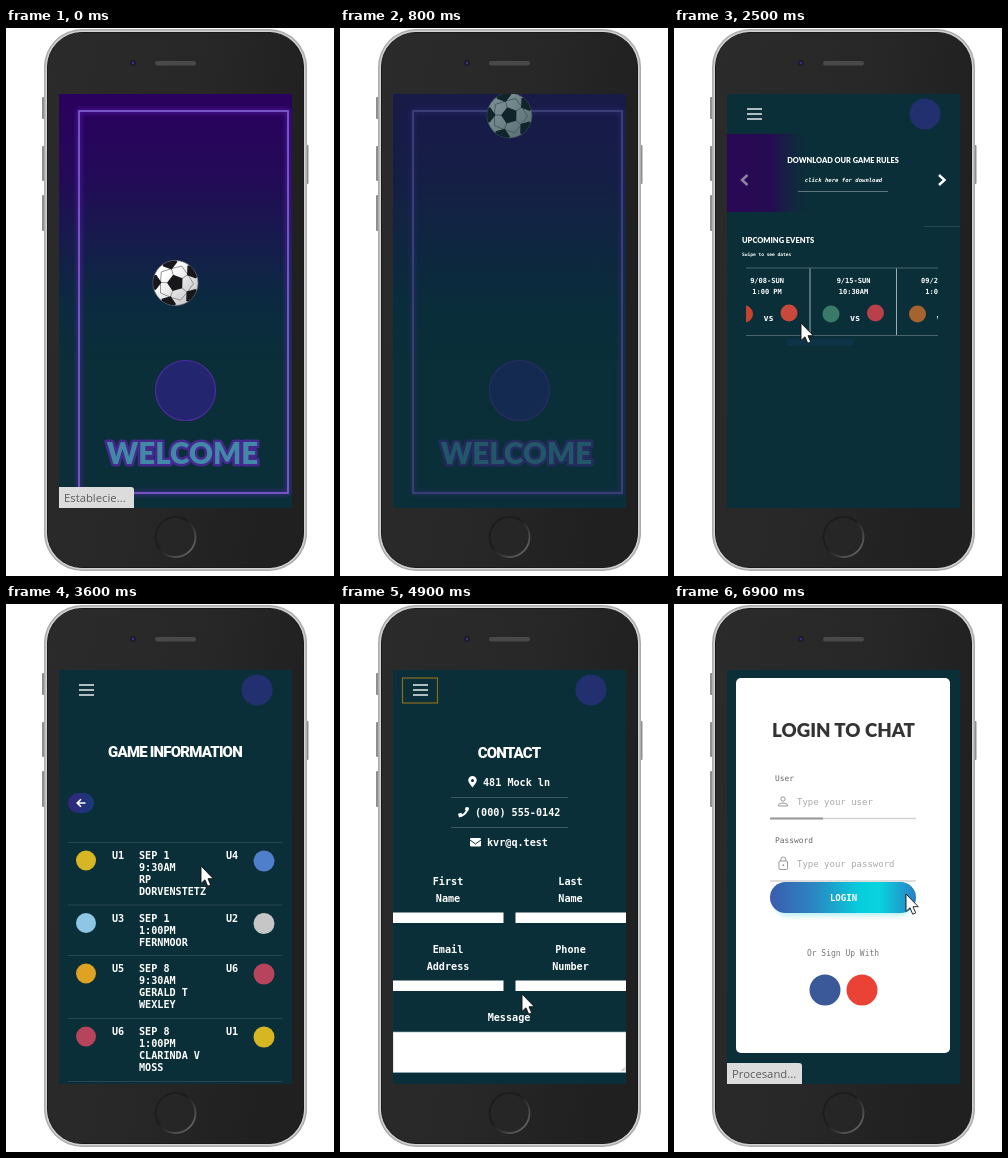
Write an HTML page that moves like this. It is 328 px wide and 548 px high and loops after 8000 ms.

```html
<!DOCTYPE html>
<html lang="en">
<head>
<meta charset="utf-8">
<title>League app demo</title>
<style>
html, body { margin: 0; width: 100%; height: 100%; overflow: hidden; background: #fff; }
svg { display: block; }
.scene { display: none; }
.mono { font-family: "DejaVu Sans Mono", "Noto Sans Mono", monospace; }
.geo { font-family: Lato, sans-serif; font-weight: 900; }
.head { font: 900 15px Roboto, sans-serif; letter-spacing: -.8px; }
.ui { font-family: "Open Sans", sans-serif; }
.b { font-weight: 700; }
</style>
</head>
<body>
<svg id="stage" width="328" height="548" viewBox="0 0 328 548"></svg>
<script>
const rect = (x, y, w, h, fill, more = '') =>
  `<rect x="${x}" y="${y}" width="${w}" height="${h}" fill="${fill}" ${more}/>`;
const disc = (x, y, r, fill, more = '') => `<circle cx="${x}" cy="${y}" r="${r}" fill="${fill}" ${more}/>`;
const path = (d, stroke, w = 1, more = 'fill="none"') =>
  `<path d="${d}" stroke="${stroke}" stroke-width="${w}" ${more}/>`;
const text = (s, x, y, size, cls = 'mono b', fill = '#fff', anchor = 'start', more = '') =>
  `<text x="${x}" y="${y}" font-size="${size}" class="${cls}" fill="${fill}" text-anchor="${anchor}" ${more}>${s}</text>`;
const mid = (s, x, y, size, cls, fill, more) => text(s, x, y, size, cls, fill, 'middle', more);
const group = (id, body, more = '') => `<g id="${id}" ${more}>${body}</g>`;
const scene = (id, body) => group(id, body, 'class="scene"');
const gradient = (id, dir, stops) => `<linearGradient id="${id}" ${dir}>` +
  stops.map(([o, c, a = 1]) => `<stop offset="${o}" stop-color="${c}" stop-opacity="${a}"/>`).join('') +
  '</linearGradient>';

const BG = '#0a2f38', RULE = '#2b474e';
const DOWN = 'x1="0" y1="0" x2="0" y2="1"', ACROSS = 'x1="0" y1="0" x2="1" y2="0"';
const DIAGONAL = 'x1="0" y1="0" x2="1" y2="1"';

const defs = `<defs>
  <clipPath id="screenClip">${rect(53, 66, 233, 414, '#000')}</clipPath>
  <clipPath id="stripClip">${rect(72, 238, 192, 72, '#000')}</clipPath>
  <clipPath id="ballClip">${disc(0, 0, 22.5, '#000')}</clipPath>
  <filter id="glow" x="-20%" y="-60%" width="140%" height="220%"><feGaussianBlur stdDeviation="2.5"/></filter>
  ${gradient('bodyFill', 'x1="0" y1="0" x2="1" y2=".3"', [[0, '#2b2b2b'], [.6, '#272727'], [1, '#202020']])}
  ${gradient('ringFill', DIAGONAL, [[.45, '#1c1c1c'], [1, '#777']])}
  ${gradient('nightFill', DOWN, [[0, '#2b005e'], [.2, '#230a57'], [.36, '#161c4c'], [.5, '#0b2a40'], [.65, BG]])}
  ${gradient('violetFill', ACROSS, [[0, '#2b0756'], [.5, '#250d52'], [1, BG, 0]])}
  ${gradient('pillFill', ACROSS, [[0, '#33267f'], [1, '#173a78']])}
  ${gradient('ballFill', DIAGONAL, [[.3, '#fff'], [1, '#b9b9bd']])}
  ${gradient('buttonFill', ACROSS, [[0, '#3a5dae'], [.3, '#2b86c2'], [.62, '#05cfdc'], [.75, '#08d3de'], [1, '#2a7fc4']])}
</defs>`;

const phone = () =>
  [[36, 69, 22], [36, 118, 35], [36, 167, 36], [299, 117, 39]]
    .map(([x, y, h]) => rect(x, y, 3.5, h, '#8f8f8f', 'rx="1"')).join('') +
  rect(38, 1, 263, 542, '#a9abac', 'rx="38"') +
  rect(39.5, 2.5, 260, 539, '#cfd1d2', 'rx="36.5"') +
  rect(41.5, 4.5, 256, 535, 'url(#bodyFill)', 'rx="34.5" stroke="#191919"') +
  disc(127, 35, 3, '#1b1b2b') + disc(127, 35, 1.3, '#34347a') +
  rect(149, 33, 41, 4.5, '#494949', 'rx="2.2"') +
  disc(169.5, 509, 20, '#262626', 'stroke="url(#ringFill)" stroke-width="1.8"');

const polar = (r, deg) => {
  const a = deg * Math.PI / 180;
  return [r * Math.cos(a), r * Math.sin(a)];
};
const pentagon = (x, y, r, turn) => 'M' + [0, 1, 2, 3, 4].map(i => {
  const [dx, dy] = polar(r, turn + 72 * i);
  return `${(x + dx).toFixed(1)} ${(y + dy).toFixed(1)}`;
}).join('L') + 'Z';

function ball() {
  let patches = pentagon(0, 0, 8.5, 110), seams = '';
  for (let i = 0; i < 5; i++) {
    const a = 110 + 72 * i, [x1, y1] = polar(8, a), [x2, y2] = polar(15, a), [x, y] = polar(22, a);
    seams += `M${x1} ${y1}L${x2} ${y2}`;
    patches += pentagon(x, y, 8, a + 180);
    const [x3, y3] = polar(15, a + 72);
    seams += `M${x2} ${y2}L${polar(18, a + 36).join(' ')}L${x3} ${y3}`;
  }
  return disc(0, 0, 22.5, 'url(#ballFill)', 'stroke="#777" stroke-width=".7"') +
    `<g clip-path="url(#ballClip)">${path(seams, '#888', .9)}${path(patches, 'none', 0, 'fill="#17171b"')}</g>`;
}

const frame = (stroke, w, more = '') => rect(73, 83, 209, 382, 'none', `stroke="${stroke}" stroke-width="${w}" ${more}`);
const splash = () => rect(53, 66, 233, 414, 'url(#nightFill)') +
  frame('#6a2bd0', 4, 'filter="url(#glow)" opacity=".5"') + frame('#6b43bd', 2) + frame('#9577d6', .6) +
  disc(179.5, 362.5, 30, '#23256f', 'stroke="#4c2b9c" stroke-width="1.2"') +
  mid('WELCOME', 176.5, 435.5, 29.5, 'geo', '#45298f', 'stroke="#45298f" stroke-width="5" stroke-linejoin="round"') +
  mid('WELCOME', 176.5, 435.5, 29.5, 'geo', '#4289a7') +
  group('ball', ball());

const menu = '<path d="M73 81H88M73 86H88M73 91H88" stroke="#e8eded" stroke-width="1.3"/>';
const badge = disc(251, 86, 15.5, '#23306f');
const bar = focus => menu + badge +
  (focus ? rect(62.5, 74, 35, 25, 'none', 'stroke="#8d6a1c" stroke-width="1.2"') : '');

function home() {
  const cards = [
    ['9/01-SUN', '9:30AM', '#c9a52c', '#4f7fc8'],
    ['9/08-SUN', '1:00 PM', '#c4442f', '#c8483c'],
    ['9/15-SUN', '10:30AM', '#397b68', '#b9404a'],
    ['09/22-SUN', '1:00 PM', '#a5642f', '#4f7fc8'],
    ['09/29-SUN', '9:30AM', '#c9a52c', '#c8483c']
  ].map(([day, hour, a, b], i) => {
    const x = 115.5 + 86.5 * i;
    return mid(day, x + 1, 254.5, 7) + mid(hour, x + 1, 265.5, 7) + mid('vs', x + 2.5, 293, 8.5) +
      disc(x - 21.5, 286, 8.5, a) + disc(x + 23, 285, 8.5, b) +
      path(`M${x + 44} 240V307.5`, '#9badb0');
  }).join('');
  return bar() + rect(53, 106, 90, 78, 'url(#violetFill)') +
    mid('DOWNLOAD OUR GAME RULES', 169, 135, 7.4, 'geo') +
    mid('click here for download', 169.5, 154, 5.6, 'mono b', '#fff', 'font-style="italic"') +
    path('M124 163.5H214', '#5d777c') + path('M250 198.5H286', RULE) +
    path('M73.5 147L68 152L73.5 157', '#8f85a0', 2.4) + path('M265 147L270.5 152L265 157', '#fff', 2.4) +
    text('UPCOMING EVENTS', 68, 215, 7.5, 'geo') + text('Swipe to see dates', 68, 227.5, 4.55) +
    `<g clip-path="url(#stripClip)">${group('cards', cards)}${path('M72 240H264M72 307.5H264', '#4b666b')}</g>` +
    rect(72, 310.5, 67, 7, '#0c3348', 'id="thumb"');
}

function games() {
  const rows = [
    [238.5, 'U1', 'U4', '#d6b622', '#4f7fcb', ['SEP 1', '9:30AM', 'RP', 'DORVENSTETZ']],
    [301, 'U3', 'U2', '#8fc6e6', '#c6c6c6', ['SEP 1', '1:00PM', 'FERNMOOR']],
    [351.5, 'U5', 'U6', '#dfa223', '#b8435c', ['SEP 8', '9:30AM', 'GERALD T', 'WEXLEY']],
    [414.5, 'U6', 'U1', '#b8435c', '#d6b622', ['SEP 8', '1:00PM', 'CLARINDA V', 'MOSS']]
  ];
  return bar() + mid('GAME INFORMATION', 169, 153, 15, 'head') +
    rect(62, 189, 26, 20, 'url(#pillFill)', 'rx="10"') +
    path('M79.5 199H71.5M75 195.2L71.2 199L75 202.8', '#fff', 1.6) +
    rows.map(([y, a, b, ca, cb, lines]) => path(`M62 ${y}H276`, RULE) +
      disc(80, y + 18, 10, ca) + disc(258, y + 18.5, 10.5, cb) +
      text(a, 106, y + 16.5, 10.15) + text(b, 220, y + 16.5, 10.15) +
      lines.map((s, i) => text(s, 133, y + 16.5 + 12 * i, 10.15)).join('')).join('') +
    path('M62 477.5H276', RULE);
}

const places = () => bar(true) + mid('LOCATIONS', 169, 154, 15, 'head') +
  ['RP Dorvenstetz', 'Fernmoor', 'Gerald T Wexley', 'Clarinda V Moss', 'North', 'South'].map((s, i) => {
    const y = 190 + 34.7 * i;
    return rect(73, y, 193, 27.3, '#69757d', 'rx="3"') + mid(s, 169, y + 20, 11.3, 'mono', '#12303c');
  }).join('');

function contact() {
  const label = (x, y, ...lines) => lines.map((s, i) => mid(s, x, y + 17 * i, 10.15)).join('');
  const field = (x, y) => rect(x, y, 110.5, 10.5, '#fff');
  return bar(true) + mid('CONTACT', 169, 154, 15, 'head') +
    '<path d="M132.5 183.5C130 180 128.2 178.5 128.2 176.3A4.3 4.3 0 0 1 136.8 176.3C136.8 178.5 135 180 132.5 183.5Z" fill="#fff"/>' +
    disc(132.5, 176.4, 1.5, BG) + text('481 Mock ln', 143, 182, 10.15) +
    path('M119 212.5C124 211.5 127 208.5 128 203.5', '#fff', 2) +
    path('M118.5 211.5L122 210.5M126.5 206.5L127.5 203.5', '#fff', 3.6) +
    text('(000) 555-0142', 135, 212, 10.15) +
    rect(130, 234, 11, 8.5, '#fff', 'rx="1.2"') + path('M130 236L135.5 240L141 236', BG) +
    text('kvr@q.test', 147, 242, 10.15) +
    path('M111 193.5H228M111 223.5H228', '#3d585e') +
    label(108, 281, 'First', 'Name') + label(230.5, 281, 'Last', 'Name') + field(53, 308.5) + field(175.5, 308.5) +
    label(108, 349, 'Email', 'Address') + label(230.5, 349, 'Phone', 'Number') + field(53, 376.5) + field(175.5, 376.5) +
    label(169, 417, 'Message') + rect(53, 428, 233, 40.5, '#fff', 'stroke="#8fb3ba" stroke-width=".6"') +
    path('M281.5 467L285 463.5M283.5 467L285 465.5', '#888', .7);
}

const login = () => rect(62, 74, 214, 375, '#fff', 'rx="5"') +
  mid('LOGIN TO CHAT', 169.5, 133, 18.7, 'geo', '#333') +
  text('User', 101, 177, 7.9, 'mono', '#666') + text('Type your user', 123, 201, 9, 'mono', '#a9a9a9') +
  disc(109, 195, 2.2, 'none', 'stroke="#999"') + path('M104.5 202V201C105 198.5 113 198.5 113.5 201V202Z', '#999') +
  path('M96 214.5H242', '#d3d3d3', 1.5) + path('M96 214.5H149', '#9a9a9a', 1.8) +
  text('Password', 101, 239, 7.9, 'mono', '#666') + text('Type your password', 123, 263, 9, 'mono', '#a9a9a9') +
  rect(105, 257, 8.5, 8.5, 'none', 'stroke="#999" rx="1"') +
  path('M106.8 257V255.5A2.5 2.5 0 0 1 111.8 255.5V257', '#999') + disc(109.3, 261.3, 1, '#999') +
  path('M96 277H242', '#d3d3d3', 1.5) +
  rect(101, 288, 136, 24, '#7fe3ec', 'rx="12" filter="url(#glow)" opacity=".55"') +
  rect(96, 278, 146, 31, 'url(#buttonFill)', 'rx="15.5"') + mid('LOGIN', 169.5, 297, 9) +
  mid('Or Sign Up With', 169, 352, 8, 'mono', '#777') +
  disc(151, 386, 15.5, '#3b5998') + disc(188, 386, 15.5, '#ea4335');

const toast = '<path d="M53 459H125Q128 459 128 462V480H53Z" fill="#dcdcdc"/>' +
  text('', 58, 473.5, 11.3, 'ui', '#5c5c5c', 'start', 'id="status"');
const arrow = '<path d="M0 0V17.4L4 13.8L6.7 20.2L9.7 18.9L7 12.7H12.3Z" fill="#fff" stroke="#111" stroke-width=".9"/>';

const PAGES = { splash, home, games, places, contact, login };
const $ = id => document.getElementById(id);
$('stage').innerHTML = defs + phone() + `<g clip-path="url(#screenClip)">${rect(53, 66, 233, 414, BG)}` +
  Object.entries(PAGES).map(([id, draw]) => scene(id, draw())).join('') +
  scene('toast', toast) + '</g>' + scene('cursor', arrow);

// The ball slows as it nears the top while the splash fades out.
const bounce = t => {
  const rise = Math.sin(Math.PI / 2 * (t - 400) / 400);
  return [t, 'splash', { ball: 255 - 167.5 * rise, alpha: (1000 - t) / 450 }];
};

// start ms, page, state
const STEPS = [
  [0, 'splash', { status: 'Establecie...' }],
  ...[500, 600, 700, 800, 900].map(bounce),
  [1000, 'home', {}],
  [1500, 'home', { at: [215, 290] }],
  [2000, 'home', { scroll: 50, at: [187, 293] }],
  [2500, 'home', { scroll: 110, at: [127, 295] }],
  [2700, 'home', { scroll: 110, at: [140, 285] }],
  [2900, 'home', { scroll: 110, at: [178, 268] }],
  [3100, 'games', { at: [180, 266] }],
  [3600, 'games', { at: [195, 262] }],
  [3700, 'games', { at: [115, 150] }],
  [3800, 'places', { at: [82, 88] }],
  [3900, 'places', { at: [185, 241] }],
  [4400, 'contact', { at: [85, 90] }],
  [4900, 'contact', { at: [182, 390] }],
  [5900, 'login', { at: [165, 205] }],
  [6900, 'login', { at: [232, 290], status: 'Procesand...' }]
];
const LOOP = 8000;
const show = (id, on) => { $(id).style.display = on ? 'inline' : 'none'; };
const move = (id, x, y) => $(id).setAttribute('transform', `translate(${x} ${y})`);
let current;

function apply([, page, { ball = 255, alpha = 1, scroll = 0, at, status = '' }]) {
  for (const id in PAGES) show(id, id === page);
  $('splash').style.opacity = Math.min(1, alpha);
  move('ball', 169.5, ball);
  move('cards', -scroll, 0);
  move('thumb', scroll * .37, 0);
  show('cursor', at);
  if (at) move('cursor', ...at);
  show('toast', status);
  $('status').textContent = status;
}

const start = performance.now();
function tick() {
  const t = (performance.now() - start) % LOOP;
  const step = STEPS.findLast(s => s[0] <= t);
  if (step !== current) apply(current = step);
  requestAnimationFrame(tick);
}
tick();
</script>
</body>
</html>
```
